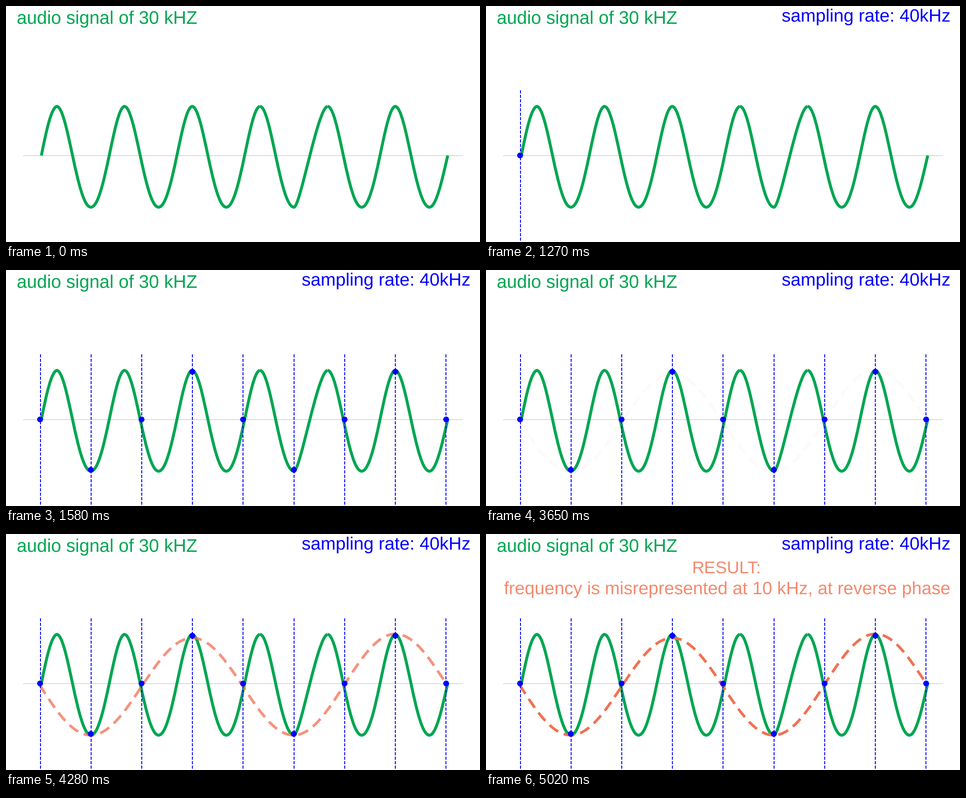
A matplotlib script for the animation above (8000 ms loop, 1058x529 px).

```python
import numpy as np
import matplotlib.pyplot as plt
from matplotlib.animation import FuncAnimation
from matplotlib.patches import Circle, PathPatch
from matplotlib.path import Path

W, H, DPI = 1058, 529, 64
PT = 72 / DPI  # points per pixel
LOOP, STEP = 8000, 20

GREEN, BLUE, ORANGE, SALMON = "#00a651", "#0000ff", "#f37053", "#f5896d"
AXIS_Y = 335

plt.rcParams.update({
    "font.family": "Liberation Sans",
    "text.hinting": "none",
    "lines.scale_dashes": False,
    "toolbar": "None",
})

fig = plt.figure(figsize=(W / DPI, H / DPI), dpi=DPI, facecolor="white")
ax = fig.add_axes([0, 0, 1, 1])
ax.set(xlim=(0, W), ylim=(H, 0))
ax.axis("off")


def dashes(on, off):
    return (0, (on * PT, off * PT))


def curve(start, segments, color, width, style="-", z=2):
    """Stroke a chain of cubic segments (c1, c2, end)."""
    points = [start] + [p for seg in segments for p in seg]
    codes = [Path.MOVETO] + [Path.CURVE4] * (len(points) - 1)
    patch = PathPatch(Path(points, codes), fill=False, ec=color, lw=width * PT,
                      ls=style, capstyle="butt", joinstyle="miter", zorder=z)
    return ax.add_patch(patch)


def label(x, y, text, size, color, ha="left"):
    return ax.text(x, y, text, size=size * PT, color=color, ha=ha,
                   va="baseline", zorder=6)


def draw_signal():
    top, low, tilt, period = 225, 451, 3.5, 151.1
    peaks = 113.2 + period * np.arange(6)
    troughs = 189.5 + period * np.arange(6)
    start = (79, AXIS_Y)
    rise = [((90, 279), (101, top + tilt), (peaks[0], top))]
    for k, (p, q) in enumerate(zip(peaks, troughs)):
        # The stroke is broken at two crests, which leaves a hairline notch.
        if k in (3, 4):
            curve(start, rise, GREEN, 6.5)
            start, rise = (p + 0.5, top), []
        rise.append(((p + 25, top), (q - 31, low), (q, low)))
        if k < 5:
            n = peaks[k + 1]
            out, into = (14, 22) if k == 3 else (31, 24)
            rise.append(((q + out, low), (n - into, top + tilt), (n, top)))
    q = troughs[-1]
    rise.append(((q + 15, low), (972.6, 394), (986, AXIS_Y)))
    curve(start, rise, GREEN, 6.5)


def draw_alias():
    nodes = [(189, 451), (416, 233), (642, 451), (869, 224)]
    segs = [((112, 397), (148, 451), nodes[0])]
    for (x0, y0), (x1, y1) in zip(nodes, nodes[1:]):
        h = 0.364 * (x1 - x0)
        segs.append(((x0 + h, y0), (x1 - h, y1), (x1, y1)))
    segs.append(((910, 224), (944, 277), (981, 333)))
    return curve((75, 338), segs, ORANGE, 6, dashes(24, 13.6), z=3)


def draw_sample(k):
    x = 77 + 113.1 * k
    y = AXIS_Y if k % 2 == 0 else (448, 228)[k // 2 % 2]
    line, = ax.plot([x, x], [189, 525.5], color=BLUE, lw=2 * PT,
                    ls=dashes(7, 3), dash_capstyle="butt", zorder=4)
    dot = ax.add_patch(Circle((76 + 113.3 * k, y), 6.5, fc=BLUE, ec="none", zorder=5))
    return line, dot


ax.plot([38, 1020], [334.8, 334.8], color="#777777", lw=PT,
        ls=dashes(1, 1), dash_capstyle="butt", zorder=1)
draw_signal()
alias = draw_alias()
samples = [draw_sample(k) for k in range(9)]

label(24.5, 40.5, "audio signal of 30 kHZ", 40.5, GREEN)
rate = label(659.5, 36, "sampling rate: 40kHz", 40.1, BLUE)
result = [
    label(537.5, 88, "RESULT:", 38.2, SALMON, "center"),
    label(538, 136, "frequency is misrepresented at 10 kHz, at reverse phase",
          39.8, SALMON, "center"),
]


def update(i):
    t = (i + 0.5) * STEP
    rate.set_visible(t >= 500)

    shown = 0 if t < 1270 else 1 + int((t - 1270) * 8 / 310)
    for k, parts in enumerate(samples):
        for part in parts:
            part.set_visible(k < shown)

    level = np.clip((t - 3620) // 30, 0, 29) / 29
    alias.set_visible(level > 0)
    alias.set_alpha(level)

    for text in result:
        text.set_visible(t >= 5020)


anim = FuncAnimation(fig, update, frames=LOOP // STEP, init_func=lambda: update(0),
                     interval=STEP, repeat=True, repeat_delay=0)
plt.show()
```
